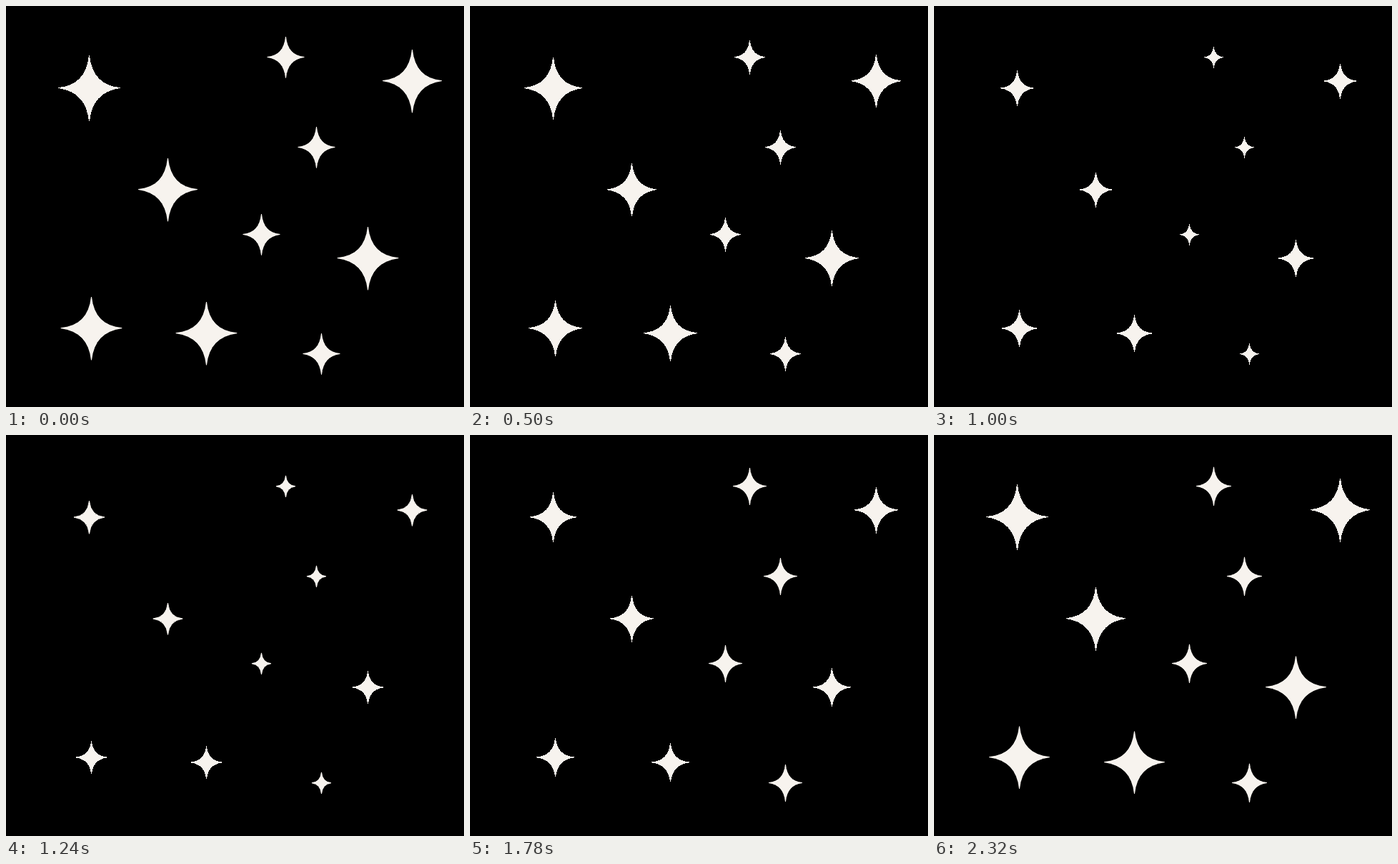
An HTML page that plays this animation: 641x561 px, repeating every 2340 ms.

```html
<!DOCTYPE html>
<html>
<head>
<meta charset="utf-8">
<title>Twinkling stars</title>
<style>
html, body { margin: 0; width: 100%; height: 100%; overflow: hidden; background: #000; }
svg { display: block; }
path { vector-effect: non-scaling-stroke; }
</style>
</head>
<body>
<svg width="641" height="561" fill="#f7f3ee" stroke="#f7f3ee" stroke-linejoin="round" shape-rendering="crispEdges"></svg>
<script>
const LOOP = 2340, STEP = 20;
const SHAPE = 'M0-1Q.1-.1 1-.018Q.1.1 0 .99Q-.1.1-1-.018Q-.1-.1 0-1Z';

// keys: start and end times of shrink, grow and the next shrink
const groups = [
  { w: 42.8, h: 46, keys: [287, 1157, 1176, 2385],
    at: [[116.5, 115.4]] },
  { w: 41.3, h: 44.3, keys: [-28, 1290, 1335, 2276, 2312, 3630],
    at: [[568.5, 105.4], [226.5, 257.4]] },
  { w: 42.7, h: 44.3, keys: [44, 1348, 1480, 2430],
    at: [[506.5, 353.4], [119.5, 451.4], [280.5, 458.4]] },
  { w: 25.8, h: 28.8, keys: [85, 1085, 1085, 2085, 2085, 3085],
    at: [[391.5, 72], [434.5, 198], [357.5, 320], [441.5, 487]] },
];

const svg = document.querySelector('svg');
for (const group of groups) {
  group.stars = group.at.map(() => {
    const star = document.createElementNS(svg.namespaceURI, 'path');
    star.setAttribute('d', SHAPE);
    return svg.appendChild(star);
  });
}

// cubic-bezier(.42, 0, .58, 1)
function easeInOut(x) {
  if (x <= 0) return 0;
  if (x >= 1) return 1;
  let low = 0, high = 1, u;
  for (let i = 0; i < 20; i++) {
    u = (low + high) / 2;
    const bx = 3 * u * (1 - u) * (.42 * (1 - u) + .58 * u) + u ** 3;
    if (bx < x) low = u; else high = u;
  }
  return u * u * (3 - 2 * u);
}

function scaleAt(keys, t) {
  let scale = 1;
  for (let i = 0; i < keys.length; i += 2) {
    const change = easeInOut((t - keys[i]) / (keys[i + 1] - keys[i])) / 2;
    scale += i % 4 ? change : -change;
  }
  return scale;
}

function draw() {
  const t = Math.floor(performance.now() % LOOP / STEP) * STEP;
  for (const { w, h, keys, at, stars } of groups) {
    const s = scaleAt(keys, t);
    stars.forEach((star, i) => {
      star.setAttribute('transform', `translate(${at[i]}) scale(${w * s} ${h * s})`);
    });
  }
  requestAnimationFrame(draw);
}
draw();
</script>
</body>
</html>
```
